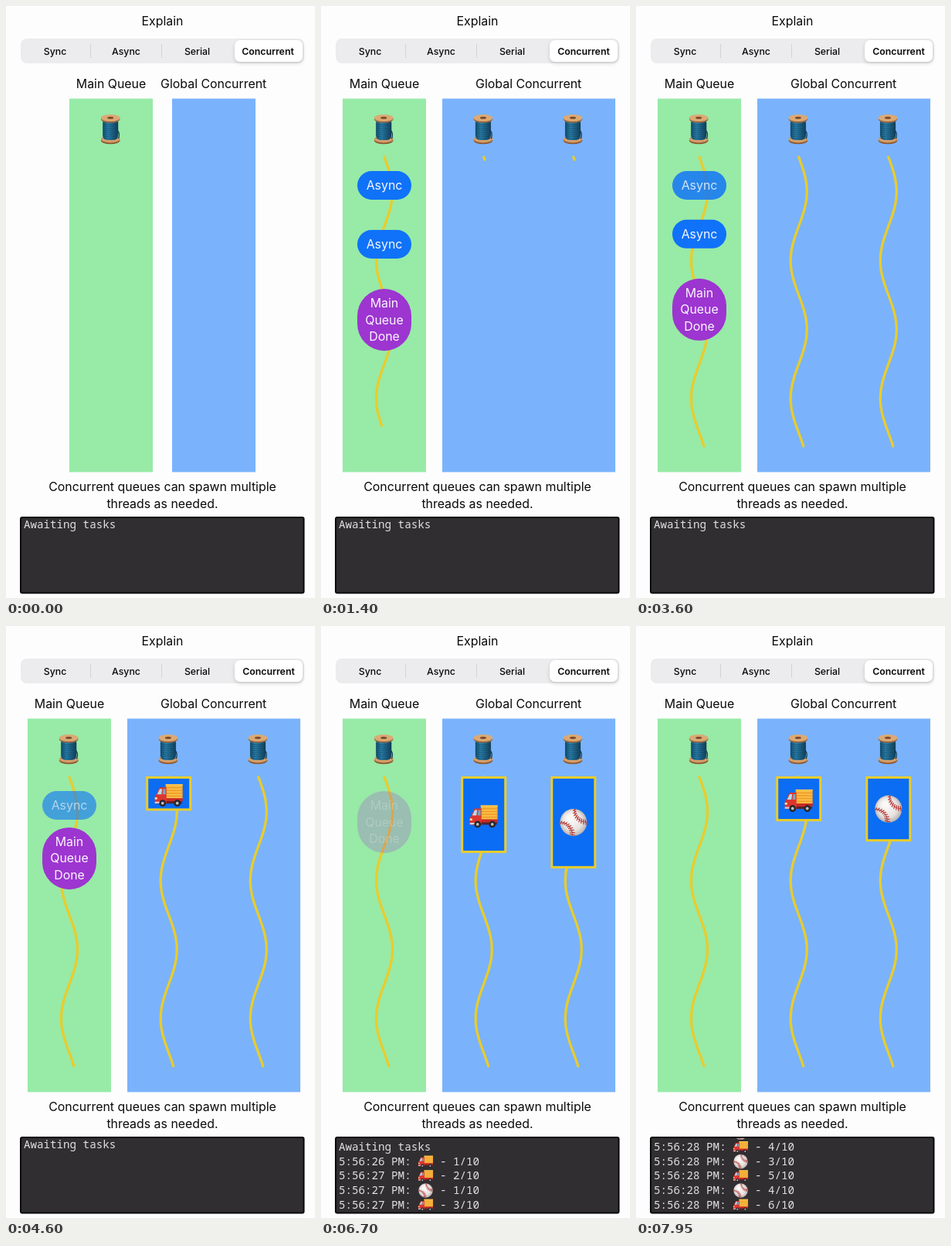
An HTML page with a canvas for the animation above (8 s loop, 400 by 764 pixels).

```html
<!DOCTYPE html>
<html lang="en">
<head>
<meta charset="utf-8">
<title>Concurrent queues</title>
<style>
html, body { margin: 0; width: 100%; height: 100%; overflow: hidden; background: #fefdfe; }
canvas { display: block; width: 400px; height: 764px; }
</style>
</head>
<body>
<canvas id="stage" width="400" height="764"></canvas>
<script>
const ctx = document.getElementById('stage').getContext('2d');
const LOOP = 8000, STEP = 350, DRAW = 1500;
const SANS = 'Inter, "Liberation Sans", sans-serif';
const MONO = '"Noto Sans Mono", "DejaVu Sans Mono", monospace';
const YELLOW = '#e9cc2c';
const TAU = Math.PI * 2;

// Times at which things happen, in ms
const MAIN_THREAD = 180, SPLIT = 720, GLOBAL_THREADS = 1300;
const LEAVES = [3500, 4450, 6470];
const JOBS = [
  { x: 210.7, start: 4460, ticks: [5180, 5950, 6525, 6950, 7350, 7755], icon: truck },
  { x: 326.8, start: 5352, ticks: [6150, 6720, 7230, 7750], icon: ball }
];
const SECONDS = [5920, 6920];
const LOG = JOBS.flatMap(job => job.ticks.map((at, i) => ({
  at, icon: job.icon, count: i + 1,
  second: 26 + SECONDS.filter(s => at >= s).length
}))).sort((a, b) => a.at - b.at);

const lerp = (a, b, p) => a + (b - a) * p;

// cubic-bezier(.42, 0, .58, 1)
function ease(x) {
  if (x <= 0) return 0;
  if (x >= 1) return 1;
  let lo = 0, hi = 1, u = 0.5;
  for (let i = 0; i < 20; i++) {
    u = (lo + hi) / 2;
    const bx = 1.26 * u * (1 - u) ** 2 + 1.74 * u * u * (1 - u) + u ** 3;
    if (bx < x) lo = u; else hi = u;
  }
  return u * u * (3 - 2 * u);
}
const since = (t, start, dur = STEP) => ease((t - start) / dur);

function rect(x, y, w, h, fill) {
  ctx.fillStyle = fill;
  ctx.fillRect(x, y, w, h);
}

function round(x, y, w, h, r, fill) {
  ctx.fillStyle = fill;
  ctx.beginPath();
  ctx.roundRect(x, y, w, h, r);
  ctx.fill();
}

function oval(x, y, rx, ry, fill) {
  ctx.fillStyle = fill;
  ctx.beginPath();
  ctx.ellipse(x, y, rx, ry, 0, 0, TAU);
  ctx.fill();
}

function poly(points, fill) {
  ctx.fillStyle = fill;
  ctx.beginPath();
  points.forEach(p => ctx.lineTo(...p));
  ctx.fill();
}

function text(s, x, y, { size = 15.9, weight = 400, fill = '#0a0a0a', align = 'center', family = SANS } = {}) {
  ctx.font = `${weight} ${size}px ${family}`;
  ctx.textAlign = align;
  ctx.fillStyle = fill;
  ctx.fillText(s, x, y);
}

// Runs draw with its own origin, scale and opacity
function at(x, y, scale, alpha, draw) {
  ctx.save();
  ctx.translate(x, y);
  ctx.scale(scale, scale);
  ctx.globalAlpha *= alpha;
  draw();
  ctx.restore();
}

function spool() {
  oval(0, 14.5, 12.3, 4.8, '#8f5a32');
  oval(0, 12.8, 12.3, 4.6, '#d39d68');
  const body = ctx.createLinearGradient(-10, 0, 10, 0);
  body.addColorStop(0, '#14506f');
  body.addColorStop(0.35, '#2a80ac');
  body.addColorStop(1, '#12415c');
  round(-10, -11, 20, 25, [2, 2, 6, 6], body);
  ctx.strokeStyle = 'rgba(10, 50, 75, .55)';
  ctx.lineWidth = 0.8;
  for (let y = -7; y < 13; y += 2.6) {
    ctx.beginPath();
    ctx.moveTo(-10, y);
    ctx.quadraticCurveTo(0, y + 3, 10, y);
    ctx.stroke();
  }
  ctx.strokeStyle = '#143e55';
  ctx.lineWidth = 1.3;
  ctx.beginPath();
  ctx.moveTo(9.5, 2);
  ctx.quadraticCurveTo(12.5, 6, 10.5, 12);
  ctx.stroke();
  oval(0, -13, 12.3, 4.8, '#9a653c');
  oval(0, -14.5, 12.3, 4.5, '#dba974');
  oval(0, -14.7, 4, 1.5, '#7c4a2b');
}

function truck() {
  rect(-15, 6, 32, 5, '#54252a');
  poly([[-4, -14], [18, -14], [18, 5], [-4, 5]], '#f0a02c');
  for (let y = -12; y < 3; y += 3.6) rect(-3, y, 20, 1.3, '#ffc84e');
  rect(-4, -14, 22, 1.4, '#ffd05a');
  rect(-4, 4, 22, 4, '#c92a26');
  ctx.fillStyle = '#dc3630';
  ctx.beginPath();
  ctx.moveTo(-3, -10);
  ctx.lineTo(-12, -10);
  ctx.lineTo(-16, -1);
  ctx.lineTo(-18, 2);
  ctx.lineTo(-18, 11);
  ctx.lineTo(-3, 11);
  ctx.fill();
  poly([[-11.5, -8], [-8.5, -8], [-9.5, -1], [-15, -1]], '#b9dbe8');
  poly([[-7, -8], [-4.2, -8], [-4.2, -1], [-8, -1]], '#75a7c2');
  rect(-18, 3, 3, 2.5, '#ffe9a0');
  rect(-18, 8.5, 8, 2.2, '#d4d0d2');
  for (const x of [-8, 11]) {
    oval(x, 10.5, 4.4, 4.4, '#29262b');
    oval(x, 10.5, 1.9, 1.9, '#bdbcc0');
  }
}

function ball() {
  const shade = ctx.createRadialGradient(-4, -6, 3, 0, 0, 18);
  shade.addColorStop(0, '#fbf9f7');
  shade.addColorStop(0.65, '#e6e2e0');
  shade.addColorStop(1, '#b5adad');
  oval(0, 0, 17.5, 17.5, shade);
  ctx.save();
  ctx.beginPath();
  ctx.arc(0, 0, 17.5, 0, TAU);
  ctx.clip();
  ctx.rotate(-0.75);
  ctx.strokeStyle = '#b63a38';
  for (const side of [-1, 1]) {
    const cx = side * 23;
    ctx.lineWidth = 0.9;
    ctx.beginPath();
    ctx.arc(cx, 0, 15.5, 0, TAU);
    ctx.stroke();
    ctx.lineWidth = 1.2;
    ctx.beginPath();
    for (let k = -5; k <= 5; k++) {
      const a = k * 0.19 + (side > 0 ? Math.PI : 0);
      const c = Math.cos(a), s = Math.sin(a);
      ctx.moveTo(cx + c * 13.2, s * 13.2 - 1);
      ctx.lineTo(cx + c * 17.8, s * 17.8 + 1);
    }
    ctx.stroke();
  }
  ctx.restore();
}

function thread(x, p) {
  if (p <= 0) return;
  const end = lerp(195, 568, p);
  const wave = y => x + 10.5 * Math.sin(Math.PI * (y - 195) / 89);
  ctx.strokeStyle = YELLOW;
  ctx.lineWidth = 3.3;
  ctx.lineCap = 'round';
  ctx.beginPath();
  ctx.moveTo(x, 195);
  for (let y = 196; y < end; y += 2) ctx.lineTo(wave(y), y);
  ctx.lineTo(wave(end), end);
  ctx.stroke();
}

function tasks(t, x) {
  const shown = since(t, SPLIT);
  const gone = LEAVES.map(s => since(t, s));
  const items = [['Async'], ['Async'], ['Main', 'Queue', 'Done']];
  items.forEach((lines, i) => {
    const alpha = shown * (1 - gone[i]);
    if (alpha <= 0) return;
    let top = 213 + 76 * i;
    for (let k = 0; k < i; k++) top -= 76 * gone[k];
    const tall = lines.length > 1;
    at(x, top, 1, alpha, () => {
      round(-35, 0, 70, tall ? 80 : 37, tall ? 35 : 18.5, tall ? '#9d35d0' : '#0f72f8');
      lines.forEach((s, k) => text(s, 0, 24 + 21.6 * k, { fill: '#f8f6fc' }));
    });
  });
}

function jobBox(t, job) {
  if (t < job.start) return;
  const left = job.ticks.reduce((n, tick) => n - since(t, tick) / 10, 1);
  const h = 132 * left * since(t, job.start);
  rect(job.x - 29.5, 194, 59, h, YELLOW);
  if (h <= 6) return;
  rect(job.x - 26.5, 197, 53, h - 6, '#0b6df3');
  ctx.save();
  ctx.beginPath();
  ctx.rect(job.x - 26.5, 197, 53, h - 6);
  ctx.clip();
  at(job.x, 194 + h / 2 + (job.icon === truck ? 2 : 0), 1, 1, job.icon);
  ctx.restore();
}

function segments(t) {
  round(19, 42, 367, 32, 8, '#ecebed');
  for (const x of [109, 201]) rect(x, 49, 1, 18, '#d3d2d5');
  ctx.save();
  ctx.shadowColor = 'rgba(0, 0, 0, .16)';
  ctx.shadowBlur = 5;
  ctx.shadowOffsetY = 2;
  round(296, 44, 88, 28, 7, '#fff');
  ctx.restore();
  ['Sync', 'Async', 'Serial'].forEach((s, i) =>
    text(s, 63.5 + 92 * i, 62.5, { size: 12.3, weight: 500 }));
  text('Concurrent', lerp(339, 340, since(t, 50)), 62.5, { size: 12.3, weight: 600 });
}

function consoleLog(t) {
  round(18, 659, 368.5, 99.5, 3, '#0b0a0c');
  rect(20, 661, 364.5, 95.5, '#302e31');
  ctx.save();
  ctx.beginPath();
  ctx.rect(20, 661, 364.5, 95.5);
  ctx.clip();
  const lines = [null, ...LOG.filter(e => t >= e.at)];
  const top = lines.length < 5 ? 674 : 751.7 - 18.7 * (lines.length - 1);
  const style = { size: 14.2, family: MONO, fill: '#e2e0e3', align: 'left' };
  lines.forEach((entry, i) => {
    const y = top + 18.7 * i;
    if (y < 655) return;
    if (!entry) return text('Awaiting tasks', 23, y, style);
    text(`5:56:${entry.second} PM:`, 23, y, style);
    at(135.5, y - 4.5, 0.53, 1, entry.icon);
    text(`- ${entry.count}/10`, 154, y, style);
  });
  ctx.restore();
}

function draw(t) {
  rect(0, 0, 400, 764, '#fefdfe');
  text('Explain', 202.5, 25);
  segments(t);

  const split = since(t, SPLIT);
  const mainX = lerp(136, 82, split);
  const half = lerp(54, 112, split);
  text('Main Queue', mainX, 106);
  text('Global Concurrent', 268.7, 106);
  rect(mainX - 54, 119.5, 108, 482, '#98eaa7');
  rect(269 - half, 119.5, half * 2, 482, '#7ab3fc');

  at(mainX - 0.8, 159, 1, 1, spool);
  thread(mainX, since(t, MAIN_THREAD, DRAW));
  tasks(t, mainX);

  for (const job of JOBS) {
    if (split > 0) at(job.x - 0.8, 159, 1, split, spool);
    thread(job.x, since(t, GLOBAL_THREADS, DRAW));
    jobBox(t, job);
  }

  text('Concurrent queues can spawn multiple', 202.5, 626);
  text('threads as needed.', 202.5, 647.5);
  consoleLog(t);
}

const began = performance.now();
function tick() {
  draw((performance.now() - began) % LOOP);
  requestAnimationFrame(tick);
}
tick();
</script>
</body>
</html>
```
